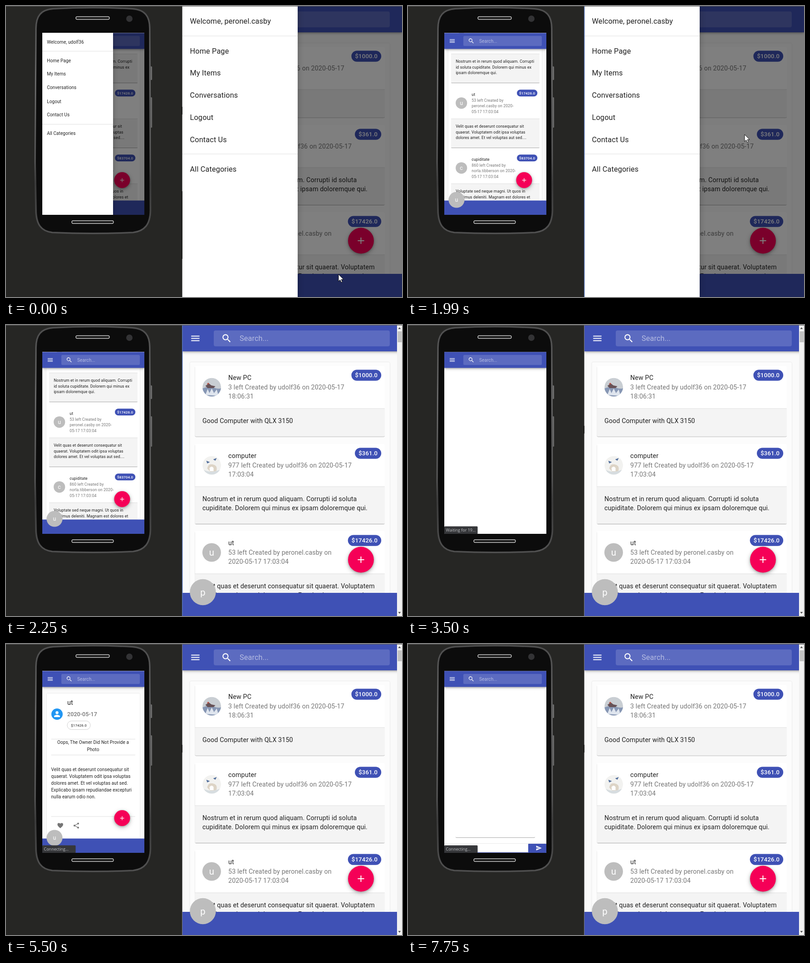
Recreate the animation shown at these times as an HTML page. Size 873 by 641 pixels, loop 7990 ms.

```html
<!DOCTYPE html>
<html lang="en">
<head>
<meta charset="utf-8">
<title>Phone and desktop app demo</title>
<style>
  html, body { margin: 0; width: 100%; height: 100%; overflow: hidden; background: #262624; }
  svg { display: block; font-family: Roboto, sans-serif; }
  .paper { filter: drop-shadow(0 1px .7px rgba(0,0,0,.34)); }
  .faint { filter: drop-shadow(0 0 1px rgba(0,0,0,.14)); }
  .bar { filter: drop-shadow(0 1px 2px rgba(0,0,0,.28)) drop-shadow(0 2px 3px rgba(0,0,0,.16)); }
  .fab { filter: drop-shadow(0 1px 2px rgba(0,0,0,.24)) drop-shadow(0 3px 5px rgba(0,0,0,.26)); }
  .drawer { filter: drop-shadow(0 3px 7px rgba(0,0,0,.25)); }
</style>
</head>
<body>
<svg id="stage" width="873" height="641" viewBox="0 0 873 641"></svg>
<script>
const LOOP = 7990;
const BLUE = '#3f51b5', PINK = '#f50057', GREY = '#bdbdbd';
const INK = 'rgba(0,0,0,.87)', SOFT = 'rgba(0,0,0,.54)', RULE = '#e0e0e0';
const DESK = 1.016, PHONE = .625; // size of one app pixel

const ICON = {
  menu: 'M3 18h18v-2H3v2zm0-5h18v-2H3v2zm0-7v2h18V6H3z',
  search: 'M15.5 14h-.8l-.3-.3A6.5 6.5 0 1 0 13.7 14.4l.3.3v.8l5 5 1.5-1.5-5-5zm-6 0a4.5 4.5 0 1 1 0-9 4.5 4.5 0 0 1 0 9z',
  plus: 'M19 13h-6v6h-2v-6H5v-2h6V5h2v6h6v2z',
  person: 'M12 12a4 4 0 1 0 0-8 4 4 0 0 0 0 8zm0 2c-2.7 0-8 1.3-8 4v2h16v-2c0-2.7-5.3-4-8-4z',
  heart: 'M12 21.3l-1.5-1.3C5.4 15.4 2 12.3 2 8.5A5.4 5.4 0 0 1 7.5 3c1.7 0 3.4.8 4.5 2.1A6 6 0 0 1 16.5 3 5.4 5.4 0 0 1 22 8.5c0 3.8-3.4 6.9-8.5 11.5z',
  send: 'M2 21L23 12 2 3v7l15 2-15 2z'
};

const rect = (x, y, w, h, fill, more = '') =>
  `<rect x="${x}" y="${y}" width="${w}" height="${h}" fill="${fill}" ${more}/>`;
const disc = (x, y, r, fill, more = '') =>
  `<circle cx="${x}" cy="${y}" r="${r}" fill="${fill}" ${more}/>`;
// Baselines sit on whole pixels, as in page layout.
const text = (x, y, s, size, fill = INK, more = '') =>
  `<text x="${x}" y="${Math.round(y)}" font-size="${size}" fill="${fill}" ${more}>${s}</text>`;
const mid = (x, y, s, size, fill, more = '') =>
  text(x, y, s, size, fill, `text-anchor="middle" ${more}`);
const group = (id, body, more = '') => `<g id="${id}" ${more}>${body}</g>`;
const icon = (name, x, y, u, fill = '#fff') =>
  `<path d="${ICON[name]}" fill="${fill}" transform="translate(${x - 12 * u} ${y - 12 * u}) scale(${u})"/>`;

const letter = (x, y, r, s, u) => disc(x, y, r, GREY) + mid(x, y + 7 * u, s, 20 * u, '#fff');
const fab = (x, y, u) => disc(x, y, 28 * u, PINK, 'class="fab"') + icon('plus', x, y, u);

function appBar(id, x, y, w, h, u, field) {
  const [fx, fy, fw, fh] = field, cy = fy + fh / 2;
  return group(id,
    rect(x, y, w, h, BLUE, 'class="bar"') +
    rect(fx, fy, fw, fh, 'rgba(255,255,255,.15)', `rx="${4 * u}"`) +
    text(fx + 56 * u, cy + 5.7 * u, 'Search...', 16 * u, 'rgba(255,255,255,.55)') +
    group(id + 'Icons', icon('menu', x + 28 * u, cy, u) + icon('search', fx + 28 * u, cy, u)));
}

function card(x, y, w, head, body, u, c) {
  const pw = (7.55 * c.price.length + 12) * u, px = x + w - 7.6 * u - pw;
  const split = y + head, line = 20 * u, size = 14 * u;
  const rows = (list, rx, ry, fill) =>
    list.map((s, i) => text(rx, ry + i * line, s, size, fill)).join('');
  const face = c.photo ? `<g transform="translate(${x + 36.5 * u} ${y + head / 2})">${c.photo}</g>`
    : letter(x + 36.3 * u, y + head / 2, 20.2 * u, c.name[0], u);
  return `<g class="paper">${rect(x, y, w, head + body, '#fff', `rx="${3 * u}"`)}</g>` +
    rect(x, split, w, body, '#f4f4f4', `rx="${2 * u}"`) +
    rect(x, split - .5, w, 1, RULE) + face +
    text(x + 72.4 * u, y + 30.6 * u, c.name, size) +
    rows(c.sub, x + 72.4 * u, y + 50.8 * u, SOFT) +
    rect(px, y + 8.3 * u, pw, 24 * u, BLUE, `rx="${12 * u}"`) +
    mid(px + pw / 2, y + 25 * u, c.price, 13 * u, '#fff', 'font-weight="500"') +
    rows(c.body, x + 16.2 * u, split + 31.3 * u);
}

function drawer(id, x, w, h, y, u, user, rules, bases, extra = '') {
  const items = ['Welcome, ' + user, 'Home Page', 'My Items', 'Conversations', 'Logout', 'Contact Us', 'All Categories'];
  return group(id,
    rect(x, y, w, h, '#fff', 'class="drawer"') + extra +
    rules.map(r => rect(x, r, w, 1, RULE)).join('') +
    items.map((s, i) => text(x + 16.3 * u, bases[i], s, 16 * u)).join(''));
}

const lakePhoto = `<g clip-path="url(#face)">${disc(0, 0, 20.5, '#c9ced3')}
  <path d="M-21 3Q-8-3 4 1T21 2V22H-21Z" fill="#8797b4"/>
  <path d="M-14 17l5-13 4 9 5-10 5 10 6-8 4 14Z" fill="#dfe5ee"/>
  <path d="M-14-3l8-5 5 4 9 2-4 4h-13Z" fill="#675257"/><path d="M-11-6l3-4 3 3Z" fill="#b54236"/></g>`;
const snowPhoto = `<g clip-path="url(#face)">${disc(0, 0, 20.5, '#f2f2f0')}
  <path d="M-10 7q2-11 12-9t9 11-12 8Z" fill="#ddd4c6"/><path d="M-5 6q5-6 9 0v7h-8Z" fill="#fff"/>
  <path d="M-12-10l8 3-6 3ZM3-13l8-3-3 6Z" fill="#536f9c"/><path d="M-20 9q18 10 40 0v12h-40Z" fill="#d7dde0"/></g>`;

const user = 'udolf36', other = 'peronel.casby';

const deskCards = [
  [90, 155.5, { name: 'New PC', price: '$1000.0', photo: lakePhoto,
    sub: [`3 left Created by ${user} on 2020-05-17`, '18:06:31'], body: ['Good Computer with QLX 3150'] }],
  [262, 176, { name: 'computer', price: '$361.0', photo: snowPhoto,
    sub: [`977 left Created by ${user} on 2020-05-17`, '17:03:04'],
    body: ['Nostrum et in rerum quod aliquam. Corrupti id soluta', 'cupiditate. Dolorem qui minus ex ipsam doloremque qui.'] }],
  [454, 176, { name: 'ut', price: '$17426.0',
    sub: [`53 left Created by ${other} on`, '2020-05-17 17:03:04'],
    body: ['Velit quas et deserunt consequatur sit quaerat. Voluptatem', 'odit ipsa voluptas dolores amet. Et vel voluptas aut sed....'] }]
];
const phoneCards = [
  [36, { name: 'computer', price: '$361.0', sub: [],
    body: ['Nostrum et in rerum quod aliquam. Corrupti', 'id soluta cupiditate. Dolorem qui minus ex', 'ipsam doloremque qui.'] }],
  [179, { name: 'ut', price: '$17426.0',
    sub: ['53 left Created by', `${other} on 2020-`, '05-17 17:03:04'],
    body: ['Velit quas et deserunt consequatur sit', 'quaerat. Voluptatem odit ipsa voluptas', 'dolores amet. Et vel voluptas aut sed....'] }],
  [322, { name: 'cupiditate', price: '$83704.0',
    sub: ['860 left Created by', 'norla.tibberson on 2020-', '05-17 17:03:04'],
    body: ['Voluptate sed neque magni. Ut quos in', 'maximus deleniti. Magnam est dolores et'] }]
];

const BODY = 'M66 50C66 22 77 8 104 6Q191 1 278 6C306 8 317 22 317 50L318.5 450C318 482 305 496 280 499Q191 503 102 499C78 496 66.5 482 66 450L64 345Z';
const slot = (x, y, w) => rect(x, y, w, 6, '#151515', 'rx="3" stroke="#d0d0d0" stroke-width="1.3"');

const shell =
  rect(317, 133, 5, 30, '#727272', 'rx="1.5"') + rect(317, 201, 5, 67, '#727272', 'rx="1.5"') +
  `<path d="${BODY}" fill="#0c0c0c" stroke="#3c3c3c" stroke-width="4"/>` +
  `<path d="${BODY}" fill="none" stroke="url(#rim)" stroke-width="1.6"/>` +
  slot(154, 23.5, 74) + slot(145, 473, 92) + disc(272, 28, 7, '#333335');

const list = group('list',
  rect(80, 59, 225, 401, '#fafafa') + rect(89, 60, 206, 390, '#fff', 'class="faint"') +
  phoneCards.map(([y, c]) => card(95, y, 195, 69.5, 63.5, PHONE, c)).join('') +
  group('press', rect(95, 179, 195, 133, 'rgba(0,0,0,.08)')));

const loading = group('loading',
  `<circle id="spin" cx="192" cy="136.5" r="11" fill="none" stroke="${BLUE}" stroke-width="2.2" stroke-dasharray="4 80"/>` +
  mid(192, 162.5, 'Loading', 10, INK));

const detail = group('item',
    rect(80, 59, 225, 401, '#fafafa') + rect(90, 109, 205, 340, '#fff', 'rx="2" class="faint"')) +
  group('detail',
    text(135, 134, 'ut', 14.5) + text(135, 158.5, '2020-05-17', 12.5, SOFT, 'font-weight="500"') +
    disc(112.5, 154.5, 12.5, '#2196f3') + icon('person', 112.5, 154.5, .8) +
    rect(135, 169.5, 51, 19, '#fff', 'rx="9.5" stroke="#c4c4c4" stroke-width=".8"') +
    mid(160.5, 181.5, '$17426.0', 8.1, INK) +
    [209, 244, 379.5].map(y => rect(99.5, y, 185.5, 1, RULE)).join('') +
    mid(192, 220.4, 'Oops, The Owner Did Not Provide a', 10, INK) + mid(192, 236, 'Photo', 10, INK) +
    ['Velit quas et deserunt consequatur sit', 'quaerat. Voluptatem odit ipsa voluptas', 'dolores amet. Et vel voluptas aut sed.',
     'Explicabo ipsam repudiandae excepturi', 'nulla earum odio non.']
      .map((s, i) => text(99.5, 280 + i * 15, s, 10)).join('') +
    icon('heart', 119.7, 400, PHONE, '#757575') +
    `<path d="M159 395.500L151 400l8 4.5" fill="none" stroke="#757575" stroke-width="1.2"/>` +
    [[159, 395.5], [150.8, 400], [159, 404.5]].map(([x, y]) => disc(x, y, 1.9, '#757575')).join('') +
    group('ripple', disc(111, 156, 9, 'rgba(255,255,255,.35)')));

const chat =
  group('thread', rect(105, 105, 175, 321, '#fff', 'rx="2" class="paper"')) +
  group('reply', rect(80, 439, 225, 1, '#e8e8e8') + rect(265, 440, 40, 20, BLUE, 'rx="1"') + icon('send', 288.5, 449.5, .58)) +
  group('focus', rect(80, 458.5, 185, 1.5, '#6f7cc8'));

const phone = `<g clip-path="url(#screen)" letter-spacing=".094">` +
  rect(80, 59, 225, 402, '#fff') + list + loading + detail + chat +
  group('foot', rect(80, 428.5, 225, 32, BLUE) + fab(256, 383.5, PHONE)) +
  group('me', letter(107, 427, 17.6, 'u', PHONE)) +
  appBar('bar', 80, 59.5, 225, 35, PHONE, [122, 66, 173, 22]) +
  group('status',
    rect(80, 443.5, 73.5, 17, '#36373a', 'rx="1.5"') +
    ['Waiting for 19...', 'Connecting...'].map((s, i) =>
      text(83.5, 455, s, 9, '#bfc1c4', `id="status${i}" letter-spacing="0" font-family="Open Sans, sans-serif"`)).join('')) +
  group('phoneShade', rect(80, 59, 225, 402, '#000')) +
  drawer('phoneDrawer', 80, 156, 402, 59, PHONE, user, [99, 260], [83, 123.5, 153.4, 183.3, 213.5, 243.4, 284]) + '</g>';

const tick = (y, d) => `<path d="M864.5 ${y}h6l-3 ${d}Z" fill="#555"/>`;
const desk = `<g clip-path="url(#window)" letter-spacing=".152">` +
  rect(389, 0, 484, 641, '#fafafa') + rect(405.5, 82, 440.5, 560, '#fcfcfc', 'rx="3" class="faint"') +
  deskCards.map(([y, h, c]) => card(416.5, y, 418.5, 94, h - 94, DESK, c)).join('') +
  rect(389, 590, 484, 51, BLUE) + fab(782.5, 517, DESK) + letter(434, 588.5, 28.7, 'p', DESK) +
  appBar('deskBar', 389, 1, 484, 57, DESK, [458, 12, 388, 35]) +
  group('deskShade', rect(389, 1, 484, 640, '#000')) +
  group('scroll', rect(862, 1, 11, 640, '#f1f1f1') + rect(863.5, 14, 9, 24, '#c1c1c1') + tick(9, -4) + tick(632, 4)) +
  drawer('deskDrawer', 389, 254, 640, 1, DESK, other, [65.5, 325.5], [39, 104.5, 153, 202.3, 251, 299.5, 364.7],
    group('hover', rect(389, 269, 254, 49, '#f7f7f7'))) + '</g>';

const edge = rect(388, 0, 1, 641, '#7c7c7c') + rect(388, 222, 1, 17, '#111') +
  group('idle', rect(388, 408, 1, 149, '#111')) +
  group('active', rect(388, 0, 1.5, 641, '#5874b4'));

const pointer =
  group('arrow', '<path d="M0 0V15.5L3.6 12.2 6 17.7 8.5 16.6 6.1 11.3H11Z" fill="#fff" stroke="#000" stroke-width=".9"/>') +
  group('hand', `<path d="M599.5 301V293q1.5-2.5 3 0v5q1.5-1.5 2.5.3 1.5-1 2.2.7 1.3-.5 1.3 1.5v4l-1.5 4.5h-6l-5-7q0-2.5 2-1.5Z"
    fill="#fff" stroke="#000"/>`);

document.getElementById('stage').innerHTML = `<defs>
  <clipPath id="screen"><rect x="80" y="59.5" width="225" height="400.5"/></clipPath>
  <clipPath id="window"><rect x="389" y="0" width="484" height="641"/></clipPath>
  <clipPath id="face"><circle r="20.5"/></clipPath>
  <linearGradient id="rim" x1="0" y1="0" x2="0" y2="1">
    <stop offset="0" stop-color="#555"/><stop offset=".3" stop-color="#808080"/>
    <stop offset=".67" stop-color="#606060"/><stop offset=".78" stop-color="#3a3a3a"/><stop offset="1" stop-color="#5c5c5c"/>
  </linearGradient></defs>` +
  rect(0, 0, 873, 641, '#262624') + shell + phone + desk + edge + rect(0, 0, 873, 1, '#5c5c5c') + pointer;

// Each track is a list of [ms, value]; a value holds until the next one.
function track(id, prop, steps) {
  const frames = steps.map(([ms, v]) => ({ offset: ms / LOOP, [prop]: v, easing: 'step-end' }));
  frames.push({ offset: 1, [prop]: steps[steps.length - 1][1] });
  document.getElementById(id).animate(frames, { duration: LOOP, iterations: Infinity });
}
const move = (id, steps) => track(id, 'transform', steps.map(([ms, x, y = 0]) => [ms, `translate(${x}px, ${y}px)`]));

// Visible from the first time to the second, and so on.
function show(id, ...times) {
  const steps = times.map((ms, i) => [ms, i % 2 ? 0 : 1]);
  if (times[0] > 0) steps.unshift([0, 0]);
  track(id, 'opacity', steps);
}

move('phoneDrawer', [[0, 0], [1630, -81], [1750, -190]]);
track('phoneShade', 'opacity', [[0, .5], [1630, .1], [1750, 0]]);
move('deskDrawer', [[0, 0], [2130, -132], [2250, -300]]);
track('deskShade', 'opacity', [[0, .5], [2130, .1], [2250, 0]]);
show('scroll', 2130);
show('hover', 1630, 1750);
show('idle', 0, 1360);
show('active', 1360, 2990);

move('arrow', [[0, 733, 591], [250, 765, 566], [370, 690, 492], [490, 585, 412], [620, 478, 345], [740, 413, 319],
  [880, 390, 322], [990, 346, 326], [1110, 306, 331], [1750, 672, 292], [1870, 725, 285], [1990, 742, 283], [2130, 358, 260]]);
show('arrow', 0, 1250, 1750, 2250);
show('hand', 1630, 1750);

show('list', 0, 3500);
show('press', 3130, 3500);
show('bar', 0, 3620, 4000);
show('barIcons', 0, 6380, 7500);
show('loading', 4000, 4620);
show('item', 4620, 6380);
show('detail', 4990, 6380);
show('ripple', 6110, 6380);
show('foot', 0, 3500, 4620, 6380);
show('me', 0, 3500, 4750, 6380);
show('status', 3250);
show('status0', 3250, 5500);
show('status1', 5500);
show('thread', 7500);
show('reply', 7620);
show('focus', 7750);

const spin = document.getElementById('spin');
spin.style.transformOrigin = '192px 136.5px';
track('spin', 'transform', [[0, 0], [4000, -70], [4130, -25], [4250, 30], [4380, 85], [4500, 150]]
  .map(([ms, deg]) => [ms, `rotate(${deg}deg)`]));
track('spin', 'strokeDasharray', [[0, '4 80'], [4380, '14 80'], [4500, '28 80']]);
</script>
</body>
</html>
```
